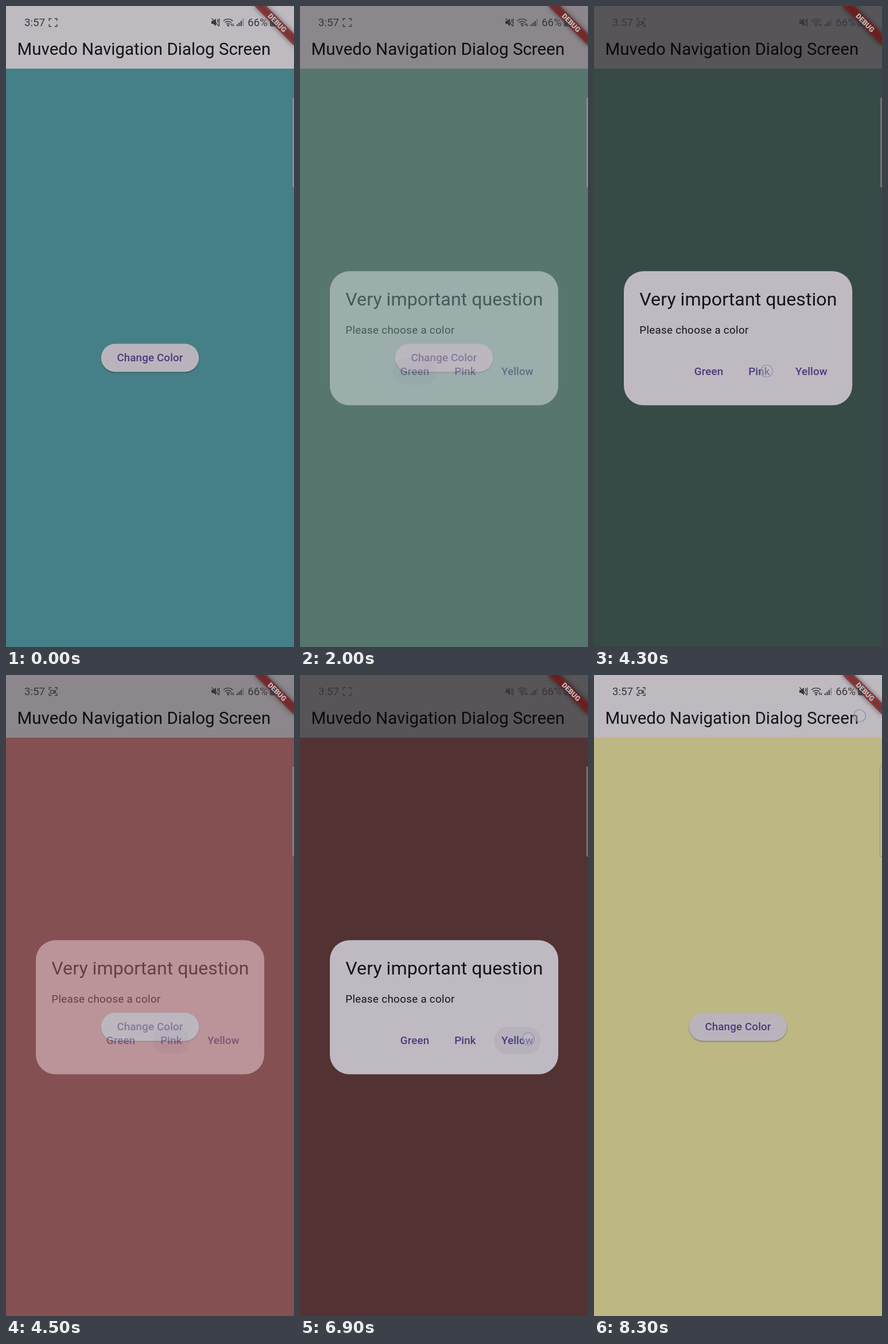
An HTML page that plays this animation: 502x1115 px, repeating every 8500 ms.

```html
<!DOCTYPE html>
<html lang="en">
<head>
<meta charset="utf-8">
<title>Color dialog</title>
<style>
  html, body { margin: 0; height: 100%; overflow: hidden; }
  svg { display: block; width: 100vw; height: 100vh; font-family: Roboto, sans-serif; }
  .label { font-size: 18.79px; font-weight: 500; letter-spacing: .12px; fill: #4d3c7b; text-anchor: middle; }
  .ink { fill: #161418; }
  .line { fill: none; stroke: #39373b; stroke-width: 1.3; }
  .solid { fill: #39373b; }
</style>
</head>
<body>
<svg viewBox="0 0 502 1115">
  <defs>
    <filter id="soft" x="-50%" y="-150%" width="200%" height="400%"><feGaussianBlur stdDeviation="4.87"/></filter>
    <filter id="lift" x="-10%" y="-20%" width="120%" height="150%"><feGaussianBlur stdDeviation="1"/></filter>
  </defs>

  <rect id="page" width="502" height="1115"/>
  <rect width="502" height="109" fill="#bfb9c0"/>
  <text class="ink" x="19.5" y="85.4" font-size="29.53">Muvedo Navigation Dialog Screen</text>

  <rect x="166" y="589" width="170" height="48.6" rx="24.3" opacity=".4" filter="url(#lift)"/>
  <rect x="165.7" y="587.6" width="170.6" height="48.8" rx="24.4" fill="#b9b4bc"/>
  <text class="label" x="251" y="618.3">Change Color</text>

  <g id="dialog">
    <rect width="502" height="1115" opacity=".54"/>
    <rect x="52" y="461.3" width="398.2" height="233.2" rx="34.2" fill="#bfbac1"/>
    <text class="ink" x="79.3" y="520.9" font-size="32.21">Very important question</text>
    <text class="ink" x="79.3" y="570.2" font-size="18.79" letter-spacing=".305">Please choose a color</text>
    <rect id="pill" y="612" height="47" rx="23.5" fill="#4d3c7b" opacity=".07"/>
    <text class="label" x="200" y="642">Green</text>
    <text class="label" x="288" y="642">Pink</text>
    <text class="label" x="379" y="642">Yellow</text>
  </g>

  <!-- edge handle -->
  <rect x="498.5" y="158.5" width="8" height="158" rx="3" fill="#bebebe" fill-opacity=".38" stroke="#000" stroke-opacity=".22"/>

  <g transform="translate(502 0) rotate(45)">
    <rect x="-48.8" y="34.2" width="97.6" height="14.6" opacity=".5" filter="url(#soft)"/>
    <rect x="-48.8" y="34.2" width="97.6" height="14.6" fill="#891515" fill-opacity=".627"/>
  </g>

  <!-- status bar -->
  <g class="solid" font-size="18.7">
    <text x="32" y="35">3:57</text>
    <text x="421.3" y="35">66%</text>
    <path d="M358 26h3l5-4v13l-5-4h-3z"/>
    <path d="M402 32h2v3h-2zM405.4 29h2v6h-2zM408.8 26h2v9h-2z"/>
    <path d="M412.2 22h2v13h-2z" opacity=".4"/>
    <rect x="460" y="22" width="10.5" height="13.5" rx="2.5" opacity=".8"/>
  </g>
  <g class="line">
    <path d="M75.2 26v-4h4M85 22h4v4M89 31.5v4h-4M79.2 35.5h-4v-4"/>
    <path id="camera" d="M78 26.6h5.6v5.6h-5.6zM83.6 29l2.8-1.8v4.4l-2.8-1.8"/>
    <path d="M358.5 21.5l13 14M368.3 23l1.4 2-1.4 2 1.4 2M371 22l1 2-1 2 1 2-1 2 1 2-1 2"/>
    <path d="M379 26a12 12 0 0 1 16.5 0M381.6 29a8.2 8.2 0 0 1 11.3 0M384.2 31.8a4.6 4.6 0 0 1 6 0"/>
    <path d="M393 35v-4m-1.4 1.4l1.4-1.6 1.4 1.6M396 30.5v4m-1.4-1.4l1.4 1.6 1.4-1.6" stroke-width="1"/>
    <circle cx="387.2" cy="34" r="1"/>
  </g>

  <text transform="translate(502 0) rotate(45)" y="45.8" font-size="12.44" font-weight="900" fill="#bfbfbf" text-anchor="middle">DEBUG</text>

  <circle id="touch" r="10.5" fill="#c4bec8" fill-opacity=".45" stroke="#7d7da6" stroke-opacity=".75" stroke-width="1.2"/>
</svg>

<script>
const LOOP = 8500, STEP = 100;
const $ = id => document.getElementById(id);
const page = $('page'), dialog = $('dialog'), pill = $('pill'), camera = $('camera'), touch = $('touch');

const START_COLOR = '#457f87';
// fade-in start, fade-out start, chosen color, pressed label's center, half width and press time
const rounds = [
  { open: 650, close: 1950, color: '#78a297', x: 200, half: 38, press: 1900 },
  { open: 3200, close: 4450, color: '#b66e70', x: 288, half: 32, press: 4400 },
  { open: 5950, close: 6950, color: '#bdb783', x: 379, half: 41, press: 6900 },
];
// from, to, x, y
const taps = [
  [200, 500, 282, 610], [1800, 2000, 208, 642], [3100, 3300, 286, 611], [4300, 4500, 301, 635],
  [5700, 5900, 279, 608], [6900, 7000, 398, 633], [8200, LOOP, 463, 71],
];
// moments when the recording icon blinks
const blinks = [200, 700, 1200, 1800, 2200, 2800, 3200, 3700, 4300, 4700, 5200, 5700, 6200, 6700, 7200, 7700, 8200];

const ramp = (t, start, length) => Math.min(1, Math.max(0, (t - start) / length));
const show = (el, on) => el.setAttribute('visibility', on ? 'inherit' : 'hidden');

function draw(t) {
  const last = rounds.filter(r => t >= r.close).pop();
  page.setAttribute('fill', last ? last.color : START_COLOR);

  const shade = rounds.reduce((sum, r) => sum + ramp(t, r.open, 200) - ramp(t, r.close, 100), 0);
  dialog.setAttribute('opacity', shade);

  const pressed = rounds.find(r => t >= r.press && t < r.close + 100);
  show(pill, pressed);
  if (pressed) {
    pill.setAttribute('x', pressed.x - pressed.half);
    pill.setAttribute('width', pressed.half * 2);
  }

  show(camera, blinks.filter(b => b <= t).length % 2);

  const tap = taps.find(([from, to]) => t >= from && t < to);
  show(touch, tap);
  if (tap) touch.setAttribute('transform', `translate(${tap[2]} ${tap[3]})`);
}

const begin = performance.now();
function tick() {
  const t = (performance.now() - begin) % LOOP;
  draw(Math.floor(t / STEP) * STEP);
  requestAnimationFrame(tick);
}
tick();
</script>
</body>
</html>
```
